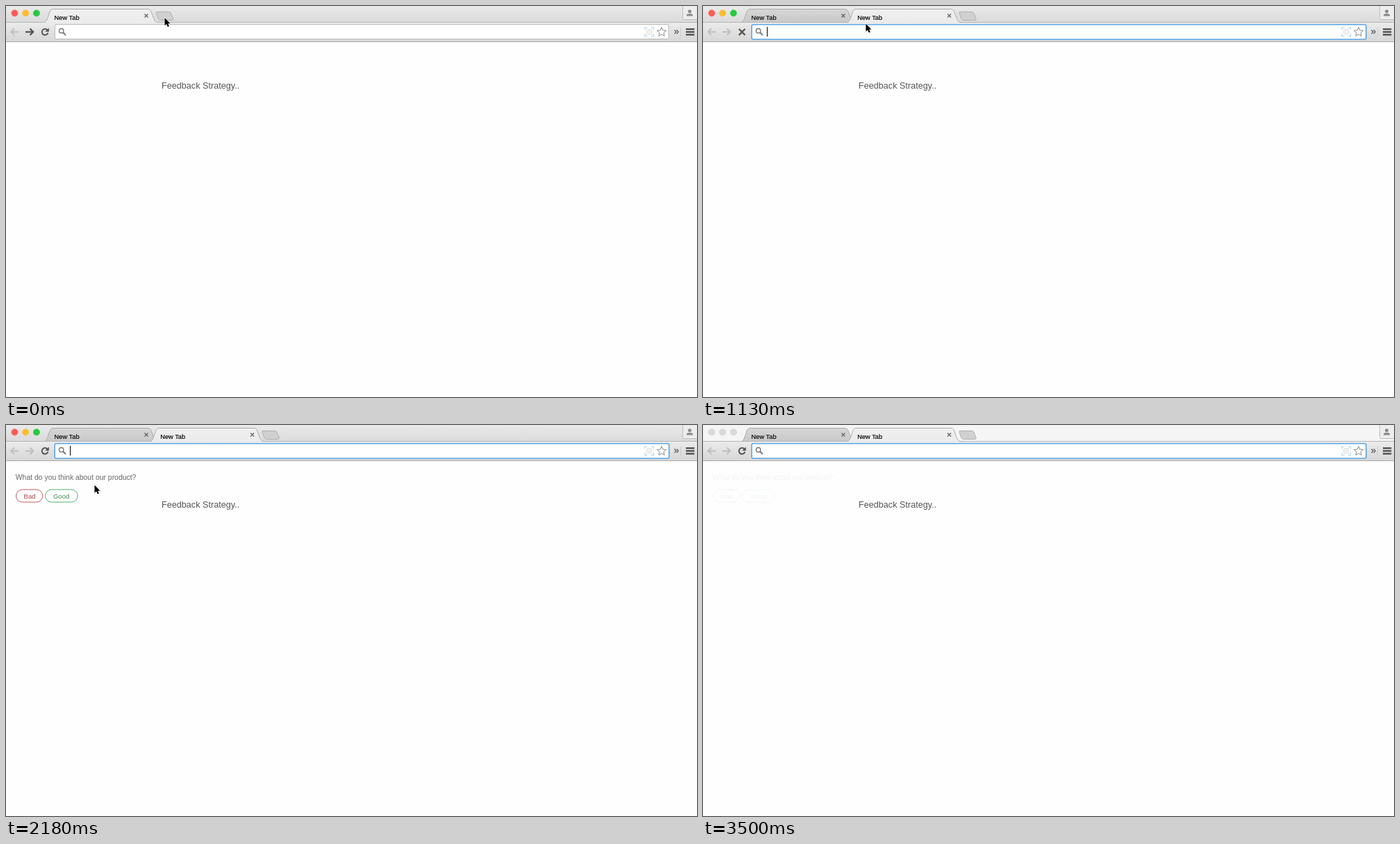
These frames come from a looping animation (995x563 px, 3620 ms). An HTML page:

```html
<!DOCTYPE html>
<html lang="en">
<head>
<meta charset="utf-8">
<title>Feedback Strategy</title>
<style>
  html, body { margin: 0; width: 100%; height: 100%; overflow: hidden; background: #fefefe; }
  svg { display: block; width: 995px; height: 563px; font-family: "Liberation Sans", Arial, sans-serif; }
</style>
</head>
<body>
<svg viewBox="0 0 995 563" fill="none">
  <defs>
    <linearGradient id="strip" x2="0" y2="1"><stop stop-color="#eaeaea"/><stop offset="1" stop-color="#dadada"/></linearGradient>
    <linearGradient id="toolbar" x2="0" y2="1"><stop stop-color="#ebebeb"/><stop offset="1" stop-color="#d7d7d7"/></linearGradient>
    <linearGradient id="front" x2="0" y2="1"><stop stop-color="#f0f0f0"/><stop offset="1" stop-color="#ebebeb"/></linearGradient>
    <linearGradient id="back" x2="0" y2="1"><stop stop-color="#d6d6d6"/><stop offset="1" stop-color="#c9c9c9"/></linearGradient>
    <clipPath id="rightPart"><rect x="92" y="66" width="120" height="18"/></clipPath>
  </defs>
  <g id="stage"></g>
</svg>
<script>
const LOOP = 3620;
const TAB_STEP = 152.6;
const stage = document.getElementById('stage');

// Each track is a list of [start time, value]; values hold until the next entry.
const cursorTrack = [[0, [228, 16.5]], [1130, [234, 25]], [1280, [240, 47]], [1430, [242, 74]],
  [1580, [188, 84]], [1730, [135, 87]], [1880, [105, 86]], [2030, [109, 86]], [2180, [127, 86]], [2330, null]];
const surveyTrack = [[0, 0], [1580, 0.05], [1730, 0.55], [1880, 1], [2330, 0.07]];
const urlCaretTrack = [[0, false], [830, true], [1580, false], [1880, true], [2480, false], [2930, true], [3500, false]];
const valueAt = (track, t) => track.filter(([start]) => start <= t).pop()[1];
const between = (t, from, to) => t >= from && t < to;

const text = (x, y, size, color, content) =>
  `<text x="${x}" y="${y}" font-size="${size}" fill="${color}">${content}</text>`;
const line = (d, color, width = 1, extra = '') =>
  `<path d="${d}" stroke="${color}" stroke-width="${width}" ${extra}/>`;
const cross = (x, y, r, color, width) =>
  line(`M${x - r} ${y - r}l${2 * r} ${2 * r}m0 ${-2 * r}l${-2 * r} ${2 * r}`, color, width);
const shift = (x, y, content) => `<g transform="translate(${x} ${y})">${content}</g>`;

function tab(x, y, title, fill) {
  return shift(x, y, `
    <path d="M54 24C58 23.5 59 20 60.5 16L63 8.5C64 5.5 65.5 4.5 68 4.5H204C206.5 4.5 208 5.5 209 8L213 18.5C214.5 22 216 23.5 219.5 24"
      fill="url(#${fill})" stroke="#ababab"/>
    ${text(69.6, 19.8, 9.3, '#000', title).replace('<text', '<text stroke="#000" stroke-width=".15"')}
    ${cross(202, 14, 2.5, '#666', 1.4)}`);
}

const newTabButton = (x, pressed) => shift(x, 0,
  `<path d="M217.5 8.5H234.5Q236.5 8.5 237.5 10.5L240.5 18Q241 20.5 239 20.5H223Q220.5 20.5 219.5 18.5L216.5 10.5Q215.7 8.5 217.5 8.5Z"
    fill="${pressed ? '#a1a1a1' : '#d0d0d0'}" stroke="${pressed ? '#929292' : '#b0b0b0'}"/>`);

function trafficLights(inactive) {
  return ['#fc5b57', '#fdbd2f', '#27c940'].map((color, i) =>
    `<circle cx="${12.5 + 15.7 * i}" cy="10.3" r="4.6" fill="${inactive ? '#dadada' : color}"
      stroke="${inactive ? '#cfcfcf' : color}" stroke-width=".6"/>`).join('');
}

const userBadge = `<rect x="974.5" y="-3" width="24" height="22.5" rx="2" fill="#ededed" stroke="#bdbdbd"/>
  <g fill="#8c8c8c"><circle cx="984.5" cy="7.7" r="2.5"/><path d="M980 14.5V13Q980 11 984.5 11T989 13V14.5Z"/></g>`;

const arrow = (x, dir, color) =>
  `<g transform="translate(${x} 37.3) scale(${dir} 1)">${line('M-6 0H5M.5 -4.7L5.2 0L.5 4.7', color, 2.3)}</g>`;

const reloadIcon = line('M59.6 34.6A4.4 4.4 0 1 0 60.4 38.6', '#555', 2) +
  '<path d="M61.8 31.5V37H56.3Z" fill="#555"/>';

function star(cx, cy, outer, inner) {
  const points = Array.from({ length: 10 }, (_, i) => {
    const r = i % 2 ? inner : outer, a = i * Math.PI / 5;
    return `${cx + r * Math.sin(a)},${cy - r * Math.cos(a)}`;
  });
  return `<polygon points="${points.join(' ')}" fill="#fff" stroke="#8a8a8a" stroke-linejoin="round"/>`;
}

const extensionIcon = line('M920 34V31H923.5M929 31H932.5V34M932.5 40V43.5H929M923.5 43.5H920V40', '#a9d3ea', 1.2) +
  '<rect x="922.5" y="33.5" width="7.5" height="7.5" rx="1" fill="#f1f1f1" stroke="#e2e6e8"/>';

function addressBar(focused, withExtension, caret) {
  const frame = focused
    ? '<rect x="70.2" y="26.7" width="884.6" height="21.3" rx="2" fill="#fff" stroke="#5aa7e6" stroke-width="1.6"/>'
    : '<rect x="70.5" y="26.5" width="883.5" height="21" rx="1.5" fill="#fff" stroke="#bababa"/>';
  return frame +
    '<circle cx="79.7" cy="35.7" r="3.2" stroke="#777" stroke-width="1.4"/>' +
    line('M82 38L86 42', '#777', 2) +
    (withExtension ? extensionIcon : '') + star(944, 37.6, 7, 3.2) +
    (caret ? '<rect x="92" y="30" width="1" height="14" fill="#000"/>' : '');
}

const menuIcons = line('M962.5 34.5L965 37.3L962.5 40M965.7 34.5L968.2 37.3L965.7 40', '#555', 1.2) +
  line('M971.5 31V44', '#cbcbcb') +
  line('M979 33.4H991.3M979 37.4H991.3M979 41.4H991.3', '#484848', 2.3);

const pill = (x, width, border, color, label, labelX) =>
  `<rect x="${x + .5}" y="93" width="${width - 1}" height="18" rx="9" stroke="${border}"/>` +
  text(labelX, 106, 9.6, color, label);

function survey(opacity, partial) {
  return `<g opacity="${opacity}">
    <g ${partial ? 'clip-path="url(#rightPart)"' : ''}>${text(13.8, 79.3, 10.42, '#666', 'What do you think about our product?')}</g>
    ${pill(14, 39.3, '#c4595d', '#a6484b', 'Bad', 25.6)}
    ${pill(56, 47.7, '#55b06f', '#478b57', 'Good', 67.9)}</g>`;
}

const pointer = ([x, y]) => shift(x, y,
  `<path d="M.5 .5V11.8L3.1 9.4L4.9 13.4L6.9 12.5L5.2 8.7H8.6Z" fill="#000" stroke="#fff" stroke-width="1.2" paint-order="stroke"/>`);

function scene(t) {
  const opened = t >= 830, opening = between(t, 830, 980);
  const loading = between(t, 830, 1880), inactive = t >= 3500;
  const cursor = valueAt(cursorTrack, t), opacity = valueAt(surveyTrack, t);
  const stripEdge = line('M0 23.5H995', '#b5b5b5');

  const tabs = opened
    ? tab(0, 0, 'New Tab', 'back') + newTabButton(TAB_STEP, false) + stripEdge +
      tab(TAB_STEP, opening ? 6 : 0, opening ? 'Untitled' : 'New Tab', 'front')
    : newTabButton(0, t >= 680) + stripEdge + tab(0, 0, 'New Tab', 'front');

  return `<rect width="995" height="24" fill="${inactive ? '#f5f5f5' : 'url(#strip)'}"/>
    ${trafficLights(inactive)}${userBadge}${tabs}
    <rect y="24" width="995" height="27" fill="url(#toolbar)"/>
    <rect y="51" width="995" height="512" fill="#fefefe"/>
    ${line('M0 51.5H995', '#ababab')}
    ${arrow(12.5, -1, '#c2c2c2')}${arrow(34, 1, opened ? '#c2c2c2' : '#555')}
    ${loading ? cross(56.2, 37.4, 4.4, '#555', 2.4) : reloadIcon}
    ${addressBar(opened, !opening, valueAt(urlCaretTrack, t))}${menuIcons}
    ${opening ? '' : text(224, 118.6, 12.65, '#555', 'Feedback Strategy..')}
    ${between(t, 140, 530) ? '<rect x="336" y="107" width="1" height="14" fill="#333"/>' : ''}
    ${opacity ? survey(opacity, t < 1730) : ''}
    ${cursor ? pointer(cursor) : ''}`;
}

let shown = '';
function draw() {
  const markup = scene(performance.now() % LOOP);
  if (markup !== shown) stage.innerHTML = shown = markup;
  requestAnimationFrame(draw);
}
draw();
</script>
</body>
</html>
```
